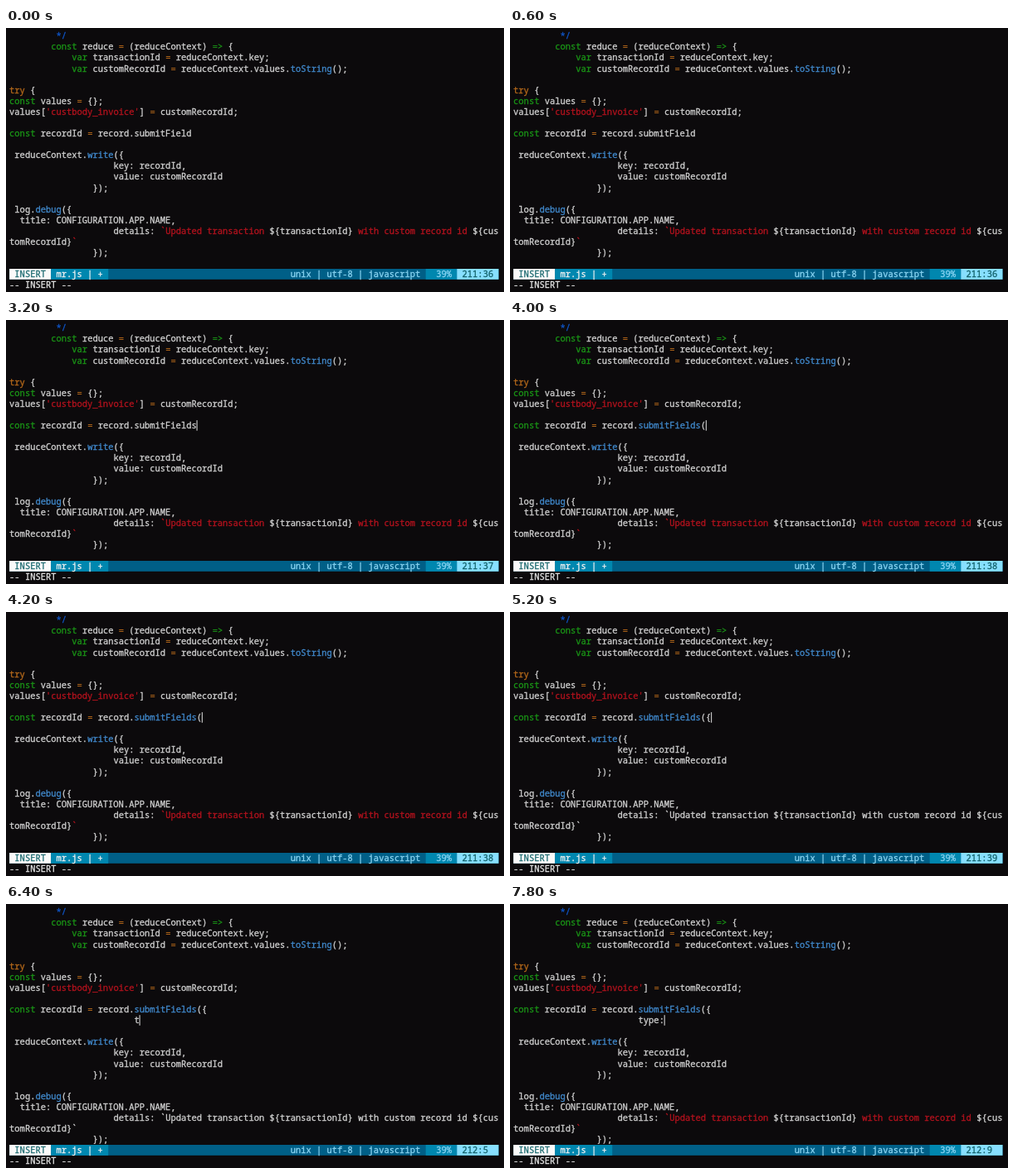
Recreate the animation shown at these times as an HTML page. Size 600 by 319 pixels, loop 8 s.

```html
<!DOCTYPE html>
<html lang="en">
<head>
<meta charset="utf-8">
<title>Typing in an editor</title>
<style>
  html, body { margin: 0; width: 100%; height: 100%; overflow: hidden; background: #0c0a0c; }
  svg { display: block; width: 100%; height: 100%; }
  text {
    font: 10.45px "Noto Sans Mono", "DejaVu Sans Mono", monospace;
    font-variant-ligatures: none;
    white-space: pre;
    stroke-width: .32px;
    stroke-linejoin: round;
  }
</style>
</head>
<body>
<svg viewBox="0 0 600 319">
  <rect width="600" height="319" fill="#0c0a0c"/>
  <g id="code"></g>
  <rect id="caret" width="1.1" height="12.6" fill="#d0d0d0"/>
  <g id="bar"></g>
</svg>
<script>
const NS = 'http://www.w3.org/2000/svg';
const LOOP = 8000;
const LEFT = 4.1, COL = 6.27, ROW = 13.09, BASE = 13.3;
const BAR_ROW = 22;

const colors = {
  w: '#d0d0d0', // plain
  g: '#1a9416', // type
  o: '#b5691a', // statement
  b: '#4089cc', // function
  c: '#0f55c8', // comment
  r: '#b2121d'  // string
};

const before = [
  '         @c*/',
  '        @gconst@w reduce @o=@w (reduceContext) @g=>@w {',
  '            @gvar@w transactionId @o=@w reduceContext.key;',
  '            @gvar@w customRecordId @o=@w reduceContext.values.@btoString@w();',
  '',
  '@otry@w {',
  '@gconst@w values @o=@w {};',
  "values[@r'custbody_invoice'@w] @o=@w customRecordId;",
  ''
];

const after = s => [
  '',
  ' reduceContext.@bwrite@w({',
  '                    key: recordId,',
  '                    value: customRecordId',
  '                });',
  '',
  ' log.@bdebug@w({',
  '  title: CONFIGURATION.APP.NAME,',
  `                    details: @${s}\`Updated transaction @w\${transactionId}@${s} with custom record id @w\${cus`,
  `tomRecordId}@${s}\``,
  '                });'
];

// Each key press: [time, text added]
const keys = [
  [2600, 's'], [3600, '('], [4600, '{'], [5400, '\n'],
  [6400, 't'], [6800, 'y'], [7200, 'p'], [7400, 'e'], [7600, ':']
];
const CARET_ON = 1400;

const code = document.getElementById('code');
const bar = document.getElementById('bar');
const caret = document.getElementById('caret');

const colX = col => LEFT + col * COL;
const rowY = row => BASE + row * ROW;

function add(parent, tag, attrs, content = '') {
  const el = document.createElementNS(NS, tag);
  for (const name in attrs) el.setAttribute(name, attrs[name]);
  el.textContent = content;
  return parent.appendChild(el);
}

function label(parent, col, row, content, fill) {
  return add(parent, 'text', { x: colX(col), y: rowY(row), fill, stroke: fill }, content);
}

// "@x" switches to colour x
function drawLine(source, row) {
  let col = 0, fill = colors.w;
  source.split(/@(.)/).forEach((part, i) => {
    if (i % 2) { fill = colors[part]; return; }
    const body = part.trimStart();
    if (body) label(code, col + part.length - body.length, row, body, fill);
    col += part.length;
  });
}

function barBox(from, to, fill) {
  add(bar, 'rect', {
    x: colX(from), y: 291, width: colX(to) - colX(from), height: 12.8, fill
  });
}

barBox(0, 94, '#005f87');
barBox(0, 8, '#fafafa');
barBox(8, 19, '#0087af');
barBox(80, 86, '#0087af');
barBox(86, 94, '#87dfff');
label(bar, 1, BAR_ROW, 'INSERT', '#1c6a70');
label(bar, 9, BAR_ROW, 'mr.js | +', '#f2f2f2');
label(bar, 54, BAR_ROW, 'unix | utf-8 | javascript', '#8ad4f2');
label(bar, 82, BAR_ROW, '39%', '#8ad4f2');
const place = label(bar, 87, BAR_ROW, '', '#12626a');
label(bar, 0, BAR_ROW + 1, '-- INSERT --', '#e6e6e6');

let shown = '';

function update(t) {
  const typed = keys.filter(k => k[0] <= t).map(k => k[1]).join('');
  caret.setAttribute('visibility', t >= CARET_ON ? 'visible' : 'hidden');
  if (typed === shown && code.firstChild) return;
  shown = typed;

  const [call, field] = typed.split('\n');
  const second = field !== undefined;
  const name = call.includes('(') ? '@b' : '';
  const tail = call.replace('(', '@w(');
  const lines = [...before, `@gconst@w recordId @o=@w record.${name}submitField${tail}`];
  if (second) lines.push(' '.repeat(24) + field);
  // The open object literal hides the string colour until its key is complete
  const broken = call.includes('{') && !typed.endsWith(':');
  lines.push(...after(broken ? 'w' : 'r'));

  code.replaceChildren();
  lines.forEach(drawLine);

  const col = second ? 24 + field.length : 35 + call.length;
  caret.setAttribute('x', colX(col) - 0.3);
  caret.setAttribute('y', rowY(second ? 10 : 9) - 10);
  place.textContent = second ? `212:${4 + field.length}` : `211:${36 + call.length}`;
}

function frame(now) {
  update(now % LOOP);
  requestAnimationFrame(frame);
}
update(0);
requestAnimationFrame(frame);
</script>
</body>
</html>
```
